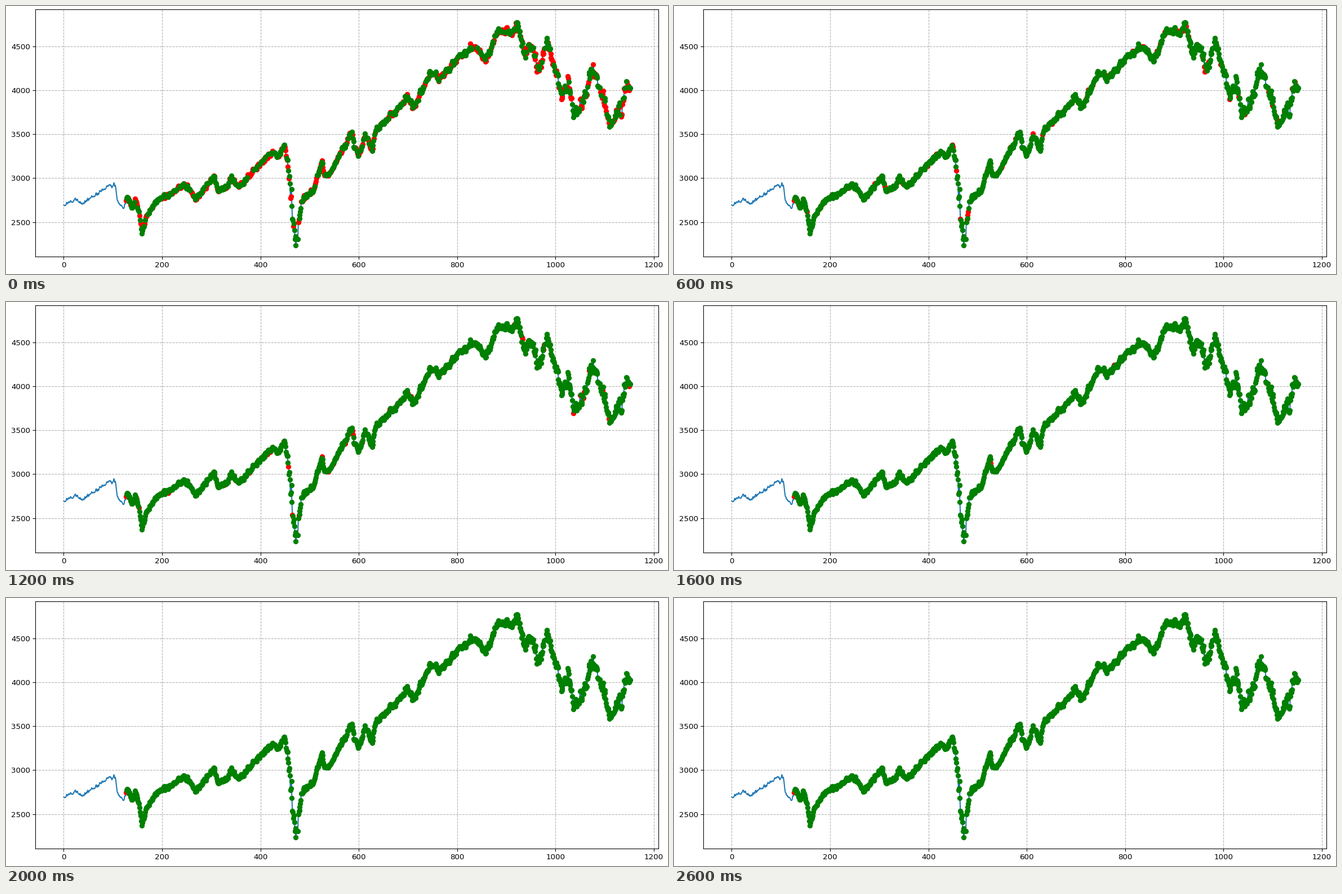
A matplotlib script for the animation above (2.8 s loop, 1175 by 477 pixels).

```python
import numpy as np
import matplotlib.pyplot as plt
from matplotlib.animation import FuncAnimation

W, H, DPI = 1175, 477, 96
N, START = 1153, 127
FRAMES, STEP_MS = 14, 200
LOW, HIGH = 2237, 4797
RED_STEPS = (9, 12)

# Turning points of the price curve: (day, price)
TURNS = [
    (0, 2690), (25, 2775), (37, 2705), (95, 2925), (105, 2920), (109, 2740),
    (121, 2660), (129, 2790), (139, 2660), (145, 2760), (153, 2620),
    (159, 2380), (168, 2570), (187, 2730), (248, 2940), (268, 2760),
    (306, 3020), (313, 2860), (330, 2890), (341, 3000), (356, 2900),
    (394, 3140), (427, 3310), (436, 3250), (449, 3380), (459, 3040),
    (472, 2270), (485, 2770), (508, 2870), (525, 3200), (530, 3040),
    (541, 3060), (586, 3530), (590, 3360), (600, 3270), (613, 3500),
    (627, 3300), (634, 3550), (669, 3730), (698, 3920), (711, 3800),
    (741, 4165), (756, 4200), (761, 4110), (799, 4365), (838, 4520),
    (858, 4330), (884, 4690), (912, 4640), (922, 4775), (939, 4370),
    (945, 4550), (967, 4210), (981, 4590), (1012, 3960), (1026, 4140),
    (1036, 3720), (1054, 3850), (1077, 4280), (1110, 3630), (1117, 3620),
    (1129, 3850), (1135, 3760), (1139, 3970), (1152, 4060),
]


def make_prices():
    """Trend plus noise that swells in the crash and in the late decline."""
    rng = np.random.default_rng(7)
    days = np.arange(N)
    trend = np.interp(days, *zip(*TURNS))
    crash = np.exp(-((days - 468) / 11) ** 2)
    vol = trend * (0.0045 + 0.03 * crash + 0.005 * (days > 930))
    white = rng.standard_normal(N + 1)
    noise = 0.85 * white[1:] + 0.5 * white[:-1]
    price = np.clip(trend + vol * noise, LOW + 70, HIGH)
    price[472] = LOW
    return days, price


def red_mask(step):
    """Days marked red at a given step; all other days are green."""
    if step in RED_STEPS:
        return np.ones(N, bool)
    share = 0.45 if step == 0 else max(0, 0.11 * (1 - (step / 8.1) ** 3))
    mask = np.random.default_rng(40 + step).random(N) < share
    mask[START] = True
    mask[[472, N - 1]] = False
    return mask


days, price = make_prices()
traded = days >= START

fig = plt.figure(figsize=(W / DPI, H / DPI), dpi=DPI, facecolor="white")
left, right, top, bottom = 52.2, 1158.2, 5.7, 445.6
ax = fig.add_axes([left / W, 1 - bottom / H,
                   (right - left) / W, (bottom - top) / H])
ax.set_xlim(-0.05 * (N - 1), 1.05 * (N - 1))
margin = 0.05 * (HIGH - LOW)
ax.set_ylim(LOW - margin, HIGH + margin)
ax.grid(linestyle="--")
ax.plot(days, price, color="tab:blue")
red_dots, = ax.plot([], [], "o", color="red")
green_dots, = ax.plot([], [], "o", color="green")


def update(step):
    red = red_mask(step)
    for dots, mask in ((red_dots, red & traded), (green_dots, ~red & traded)):
        dots.set_data(days[mask], price[mask])
    return red_dots, green_dots


anim = FuncAnimation(fig, update, frames=FRAMES, interval=STEP_MS, repeat=True)
plt.show()
```
